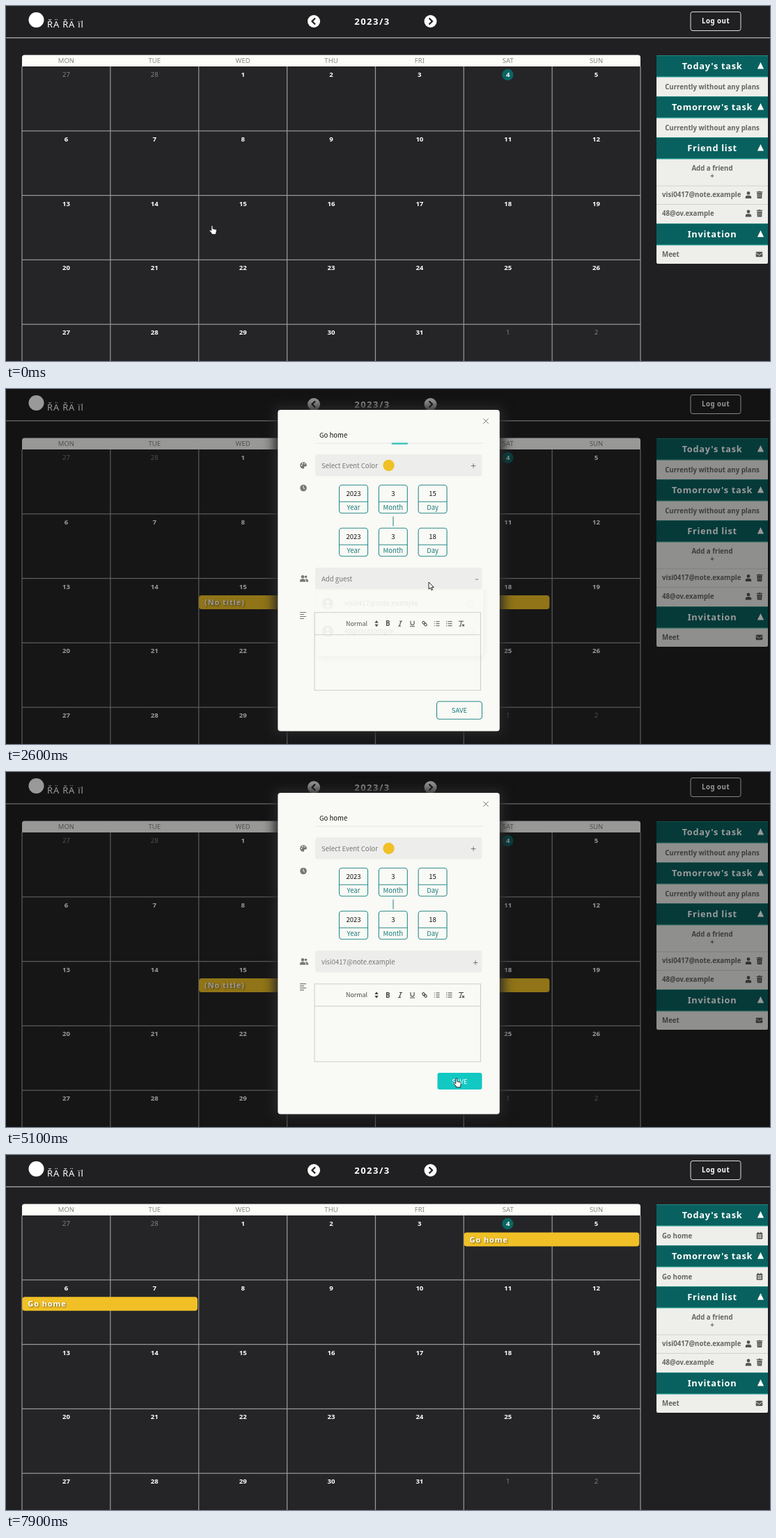
An HTML page for the animation above (8000 ms loop, 1097 by 511 pixels).

```html
<!DOCTYPE html>
<html lang="en">
<head>
<meta charset="utf-8">
<title>Calendar</title>
<style>
html, body { margin: 0; width: 100%; height: 100%; overflow: hidden; background: #202022; }
svg { display: block; width: 1097px; height: 511px; }
text { font: 600 9.7px "Noto Sans", "Open Sans", sans-serif; white-space: pre; }
.mid { text-anchor: middle; }
.white { fill: #fff; }
.day { font-size: 9.6px; fill: #fff; }
.off { font-weight: 400; fill: #818183; }
.week { font-size: 9.5px; font-weight: 400; fill: #85857f; }
.month { font-size: 13px; font-weight: 800; letter-spacing: 1.5px; fill: #fff; }
.logo { font-size: 13px; font-weight: 300; letter-spacing: .8px; fill: #fff; }
.out { letter-spacing: .5px; fill: #fff; }
.head { font-size: 12.8px; letter-spacing: .7px; fill: #fff; }
.side { fill: #666; }
.bar { font-size: 11px; letter-spacing: .9px; fill: #fff; filter: drop-shadow(1px 1px 1px #0008); }
.glow { filter: drop-shadow(0 0 4px #f0c026); }
.form { font: 400 9.55px "Noto Sans CJK TC", "Noto Sans CJK JP", "Noto Sans CJK SC", "Noto Sans", sans-serif; }
.grey { fill: #777; }
.black { fill: #111; }
.teal { fill: #187c7c; }
.box { fill: none; stroke: #2a8c8c; stroke-width: 1.1; }
.tool { fill: none; stroke: #444; stroke-width: 1.1; }
.shade { fill: #262628; filter: blur(8px); }
#drop > rect { filter: drop-shadow(3px 4px 5px #0008); }
</style>
</head>
<body>
<svg id="stage" viewBox="0 0 1097 511"></svg>
<script>
const LOOP = 8000, STEP = 100;
const LEFT = 23, TOP = 87, COL = 126.86, ROW = 92.8;
const FRIENDS = ['visi0417@note.example', '48@ov.example'];
const TITLE = 'Go home';

const text = (x, y, s, cls, id = '') => `<text x="${x}" y="${y}" class="${cls}" id="${id}">${s}</text>`;
const rect = (x, y, w, h, fill, r = 0, more = '') =>
  `<rect x="${x}" y="${y}" width="${w}" height="${h}" rx="${r}" fill="${fill}" ${more}/>`;
const dot = (x, y, r, fill) => `<circle cx="${x}" cy="${y}" r="${r}" fill="${fill}"/>`;
const path = (d, more) => `<path d="${d}" ${more}/>`;
const at = (x, y, body) => `<g transform="translate(${x} ${y})">${body}</g>`;
const group = (id, body) => `<g id="${id}">${body}</g>`;
const line = (color, w = 1) => `fill="none" stroke="${color}" stroke-width="${w}"`;

const person = (x, y) => at(x, y, dot(0, -2.5, 2.4, '#555') + path('M-4.2 5V3.6Q-4.2 .8 -1.4 .8H1.4Q4.2 .8 4.2 3.6V5Z', 'fill="#555"'));
const trash = (x, y) => at(x, y, path('M-4.2 -4.8H-1.4L-.8 -5.5H.8L1.4 -4.8H4.2V-3.5H-4.2ZM-3.6 -2.8H3.6L3.2 5H-3.2Z', 'fill="#555"')
  + path('M-1.6 -1.4V3.6M0 -1.4V3.6M1.6 -1.4V3.6', line('#bbb', .6)));
const mail = (x, y) => at(x, y, rect(-4.8, -3.7, 9.6, 7.4, '#555', 1) + path('M-4.8 -2L0 1.2L4.8 -2', line('#eee', .9)));
const plan = (x, y) => at(x, y, rect(-4.3, -4, 8.6, 9, '#555', 1) + path('M-2 -5.3V-3M2 -5.3V-3', line('#555', 1.3))
  + path('M-3.3 -1.5H3.3M-3.3 .8H3.3M-3.3 3H3.3M-1.2 -1.5V4M1.2 -1.5V4', line('#eee', .7)));

function header() {
  const nav = (x, d) => dot(x, 22, 9, '#fff') + path(`M${x + 2 * d} 17.5l${-4.5 * d} 4.5l${4.5 * d} 4.5`, line('#202022', 2.2));
  return dot(43.5, 20, 11, '#fff') + text(59, 31, 'ŘÄ ŘÄ ïl', 'logo')
    + nav(442, 1) + nav(609.5, -1) + text(526, 27, '2023/3', 'month mid')
    + rect(983, 8.5, 72, 27, 'none', 3, 'stroke="#ddd"') + text(1019, 25.4, 'Log out', 'out mid')
    + rect(0, 45.3, 1097, 1, '#d4d4d4');
}

function calendar() {
  let s = rect(LEFT, TOP, COL * 7, 430, '#252527')
    + path('M23 87V74Q23 70.5 26.5 70.5H907.5Q911 70.5 911 74V87Z', 'fill="#fdfdfa"');
  'MON TUE WED THU FRI SAT SUN'.split(' ').forEach((d, i) => s += text(LEFT + COL * (i + .5), 82.4, d, 'week mid'));
  for (let c = 0; c < 8; c++) s += rect(LEFT + c * COL - .6, TOP, 1.2, 424, '#9a9a9a');
  for (let r = 1; r < 5; r++) s += rect(LEFT, TOP + r * ROW - .6, COL * 7, 1.2, '#9a9a9a');
  s += dot(720.4, 99, 8.2, '#0a6663');
  for (let i = 0; i < 35; i++) {
    const off = i < 2 || i > 32;
    const n = i < 2 ? 27 + i : i > 32 ? i - 32 : i - 1;
    s += text(LEFT + COL * (i % 7 + .5), TOP + ROW * Math.floor(i / 7) + 15, n, 'day mid' + (off ? ' off' : ''));
  }
  return s;
}

function sidebar() {
  const head = (y, s) => rect(934, y, 160, 31, '#08615f') + rect(934, y, 160, 1, '#27877f')
    + rect(934, y + 30.3, 160, 1.2, '#2b9c90')
    + text(1014, y + 20, s, 'head mid') + path(`M1083.5 ${y + 10}l4.6 9.4h-9.2Z`, 'fill="#fff"');
  const task = y => text(942, y, TITLE, 'side') + plan(1082, y - 3.5);
  const none = y => text(1014, y, 'Currently without any plans', 'side mid');
  const friend = (y, s) => rect(934, y - 17, 160, 1, '#d2d2ce') + text(942, y, s, 'side')
    + person(1066, y - 3.5) + trash(1082, y - 3.5);
  return rect(934, 71, 160, 300, '#eeeeeb', 2)
    + head(71, "Today's task") + head(130, "Tomorrow's task") + head(189, 'Friend list') + head(313, 'Invitation')
    + group('free', none(119.5) + none(178.5)) + group('busy', task(119.5) + task(178.5))
    + text(1014, 237, 'Add a friend', 'side mid') + text(1014, 248, '+', 'side mid')
    + friend(275.4, FRIENDS[0]) + friend(302, FRIENDS[1])
    + text(942, 361, 'Meet', 'side') + mail(1081.5, 357.5);
}

function editor() {
  let s = path('M422 304.8h9M422 307.8h6M422 310.8h9M422 313.8h6', line('#777', 1.2))
    + rect(443, 305, 238.5, 112, 'none', 0, 'stroke="#ccc"') + rect(443, 336.5, 238.5, 1, '#ccc')
    + `<text x="488" y="324.3" class="form" style="font-size:8.9px;font-weight:500;fill:#444">Normal</text>`
    + path('M529.3 320l2.7-3.8l2.7 3.8ZM529.3 322l2.7 3.8l2.7-3.8Z', 'fill="#444"')
    + `<text x="545" y="324.5" style="font-weight:800;fill:#444">B</text>`
    + path('M565 317.5h4M563 324.5h4M567.2 317.5l-2.4 7', 'class="tool"')
    + path('M581 317v3.5q0 2.5 2.5 2.5t2.5-2.5V317M580 325h7', 'class="tool"')
    + `<g transform="rotate(45 601 321)" class="tool"><rect x="597" y="319.4" width="4.4" height="3.2" rx="1.6"/>`
    + `<rect x="600.6" y="319.4" width="4.4" height="3.2" rx="1.6"/></g>`;
  for (let i = 0; i < 3; i++) {
    const y = 318 + i * 3;
    s += path(`M617.5 ${y}h5M634.5 ${y}h6`, 'class="tool"')
      + path(`M614.8 ${y}h1M632 ${y}h1.2`, 'class="tool"');
  }
  return s + path('M650 317.5h7M654 317.5l-1.6 7M650.5 324.5h3M655 322l3 3M658 322l-3 3', 'class="tool"')
    + group('idle', rect(618.5, 433, 65, 25.5, 'none', 4, 'class="box"') + text(651, 449.2, 'SAVE', 'form teal mid'))
    + group('hot', rect(619.5, 433, 64, 24, '#12c8c3', 3) + text(651.5, 448.7, 'SAVE', 'form white mid'));
}

function modal() {
  const dates = (y, day) => [['2023', 'Year'], ['3', 'Month'], [day, 'Day']].map(([n, s], i) => {
    const x = 478.5 + i * 56.8;
    return rect(x, y, 41, 40.5, 'none', 4, 'class="box"') + path(`M${x} ${y + 24}h41`, 'class="box"')
      + text(x + 20.5, y + 16, n, 'form black mid') + text(x + 20.5, y + 35.8, s, 'form teal mid');
  }).join('');
  const option = (y, s) => dot(462, y, 8, '#777') + dot(462, y - 2.2, 2.5, '#fff')
    + path(`M457.2 ${y + 4.6}q4.8 -6 9.6 0q-4.8 4 -9.6 0Z`, 'fill="#fff"') + text(486, y + 3.6, s, 'form black')
    + `<circle cx="667" cy="${y}" r="4.6" fill="#fff" stroke="#999" stroke-width=".9"/>`;
  return rect(0, 0, 1097, 511, '#000', 0, 'opacity=".4"')
    + rect(385, 25, 329, 472, '#262628', 4, 'class="shade"') + rect(390.3, 30, 318.5, 462.5, '#f9f9f5', 4)
    + path('M685.3 42.5l7.4 7.4M692.7 42.5l-7.4 7.4', line('#777'))
    + text(450, 69.6, 'Add title', 'form grey', 'hint') + text(450, 69.6, '', 'form black', 'title')
    + rect(450, 58.5, 1, 14.5, '#111', 0, 'id="caret"')
    + rect(445, 77.6, 240, 1, '#e4e4e0') + rect(445, 77.5, 240, 2.2, '#2bbcbd', 0, 'id="rule"')
    + path('M427 105.3C420.5 105.3 420.5 114.7 427 114.7C429 114.7 427 112 429 111.6C432 111.6 432 110.5 431.8 109.3Q431 105.3 427 105.3Z', 'fill="#777"')
    + dot(424.4, 110, .9, '#f9f9f5') + dot(425.8, 107.4, .9, '#f9f9f5') + dot(428.8, 107.6, .9, '#f9f9f5')
    + rect(444, 94, 239.5, 31.5, '#ededeb', 4) + text(453, 113.6, 'Select Event Color', 'form grey')
    + dot(549.5, 110, 8.2, '#f0c026') + path('M667.8 110.5h6.6M671.1 107.2v6.6', line('#777'))
    + dot(427, 142.5, 4.8, '#777') + path('M427 139.5v3.2l2 1.4', line('#f9f9f5'))
    + dates(138.3, 15) + dates(200.3, 18) + path('M556 183.5v14', 'class="box"')
    + dot(426, 270.3, 2.2, '#777') + dot(430.5, 270.3, 1.8, '#777')
    + path('M421.8 277.5q0-4.2 4.2-4.2t4.2 4.2ZM431 277.5q0-3-1.2-4.2q4.4-.4 4.4 4.2Z', 'fill="#777"')
    + rect(444, 257, 239.5, 31.5, '#ededeb', 4) + text(453, 277.4, '', 'form grey', 'guest')
    + group('plus', path('M670.8 274.5h6.6M674.1 271.2v6.6', line('#777'))) + group('minus', path('M674 274h4', line('#777')))
    + group('editor', editor())
    + group('drop', rect(446, 295, 239, 99.5, '#fff', 5) + option(318.7, FRIENDS[0]) + option(358.5, FRIENDS[1])
      + group('tick', dot(667, 318.7, 5.2, '#14c4bf') + path('M664.6 318.8l1.8 1.8l3.2-3.6', line('#fff', 1.1))));
}

const outline = 'fill="#fff" stroke="#111" stroke-width=".9" stroke-linejoin="round"';
const cursor = group('arrow', path('M0 0V10.2L2.4 8L4 11.6L5.6 10.9L4 7.4H7.3Z', outline))
  + group('hand', path('M-1.2 .8C-1.2 -.4 1 -.4 1 .8V4.6L5.4 5.5Q6.6 6 6.4 7.5L5.6 11.3V12.8H-.8V11.3L-4 7.4C-4 6 -2.6 6 -1.2 7.4Z', outline));

document.getElementById('stage').innerHTML =
  header() + calendar() + group('bars', '') + sidebar() + group('modal', modal()) + group('cursor', cursor);

const $ = id => document.getElementById(id);
const show = (id, on) => { $(id).style.display = on ? '' : 'none'; };

// Value of a keyed track [time, ...values] at time t.
function track(t, keys, ease = k => k) {
  const i = keys.findIndex(k => k[0] > t);
  if (i < 0) return keys[keys.length - 1].slice(1);
  if (i === 0) return keys[0].slice(1);
  const a = keys[i - 1], b = keys[i];
  const k = ease((t - a[0]) / (b[0] - a[0]));
  return a.slice(1).map((v, j) => v + (b[j + 1] - v) * k);
}
const smooth = k => k * k * (3 - 2 * k);

const POINTER = [
  [0, 296, 316], [100, 297, 316], [800, 707, 333], [2000, 707, 333], [2400, 607, 278], [2700, 607, 278],
  [3200, 660, 318], [3500, 660, 318], [3900, 605.5, 415.5], [4300, 605.5, 415.5], [4900, 647, 441],
  [5200, 647, 441], [5800, 316, 309], [6200, 316, 309], [7100, 720, 116], [7300, 720, 116], [7800, 790, -25]
];
const RULE = [[1000, 83], [1100, 190], [1200, 240], [2400, 240], [2500, 120], [2600, 23], [2700, 0]];
const FADE = [[2500, 0], [2600, .07], [2700, .55], [2800, 1], [4200, 1], [4400, 0]];

const cellAt = (x, y) => Math.floor((y - TOP) / ROW) * 7 + Math.floor((x - LEFT) / COL);

function bars(t, x, y) {
  let first = 16, days = 4;
  if (t < 100) return '';
  if (t < 900) days = Math.max(1, cellAt(x, 316) - 15);
  if (t >= 6200) first = t < 7300 ? cellAt(x, y) : 5;
  const name = t < 5200 ? '(No title)' : TITLE;
  const lit = t >= 5700 && t < 7300;
  const grow = lit ? .6 : 0;
  let s = '';
  for (let d = first; d < first + days;) {
    const col = d % 7, n = Math.min(7 - col, first + days - d);
    const bx = LEFT + col * COL + .3, by = TOP + Math.floor(d / 7) * ROW + 24.4;
    s += rect(bx - grow, by - grow, n * COL * .992 + 2 * grow, 20 + 2 * grow, '#f0c026', 4, lit ? 'class="glow"' : '')
      + text(bx + 8, by + 14.2, name, 'bar');
    d += n;
  }
  return s;
}

function draw(t) {
  const [x, y] = track(t, POINTER, smooth);
  const open = t >= 1000 && t < 5200;
  const listed = t >= 2500 && t < 4300;
  $('bars').innerHTML = bars(t, x, y);
  show('free', t < 7300);
  show('busy', t >= 7300);
  show('modal', open);

  if (open) {
    const typed = TITLE.slice(0, Math.max(0, Math.floor((t - 1200) / 120)));
    $('title').textContent = typed;
    show('hint', !typed);
    show('caret', t < 2500 && (t < 1500 || typed.length < TITLE.length || t % 1000 < 500));
    $('caret').setAttribute('x', 450 + (typed ? $('title').getComputedTextLength() : 0));
    const [w] = track(t, RULE);
    $('rule').setAttribute('x', 565.3 - w / 2);
    $('rule').setAttribute('width', w);

    const [fade] = track(t, FADE);
    $('drop').style.opacity = fade;
    $('drop').setAttribute('transform', `translate(0 ${-11 * (1 - fade)})`);
    $('editor').setAttribute('transform', `translate(0 ${listed ? 16.7 : 0})`);
    $('guest').textContent = t < 3300 ? 'Add guest' : FRIENDS[0];
    show('tick', t >= 3300);
    show('plus', !listed);
    show('minus', listed);
    show('hot', t >= 4800);
    show('idle', t < 4800);
  }

  const hand = !open || t >= 4800 || (listed && y > 295 && y < 394);
  show('hand', hand);
  show('arrow', !hand);
  $('cursor').setAttribute('transform', `translate(${x} ${y})`);
}

const start = performance.now();
let last = -1;
function tick() {
  const t = Math.floor(((performance.now() - start) % LOOP) / STEP) * STEP;
  if (t !== last) draw(last = t);
  requestAnimationFrame(tick);
}
tick();
</script>
</body>
</html>
```
